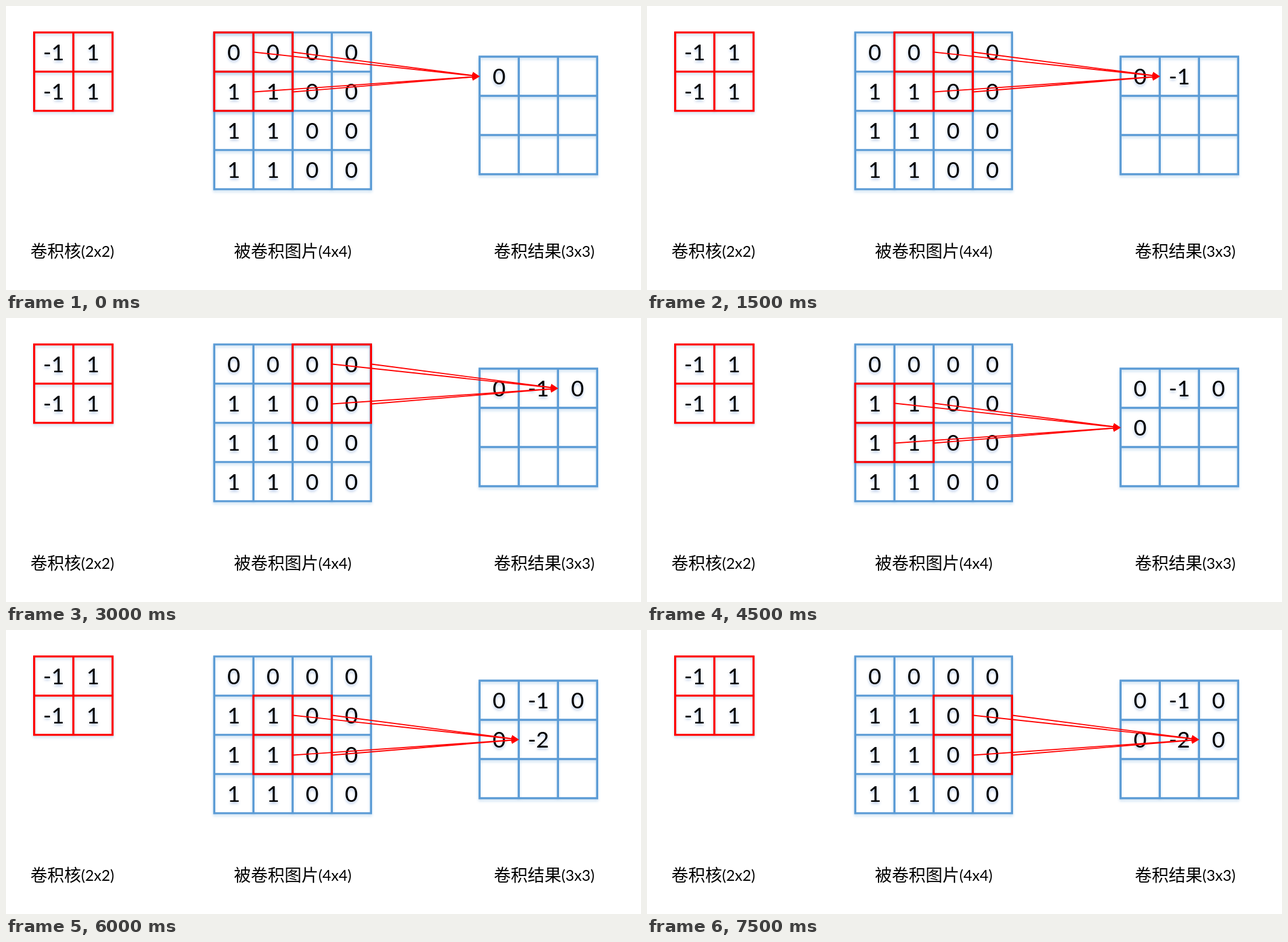
Recreate the animation shown at these times as an HTML page. Size 1053 by 471 pixels, loop 8000 ms.

```html
<!DOCTYPE html>
<html lang="zh">
<head>
<meta charset="utf-8">
<style>
  html, body { margin: 0; width: 100%; height: 100%; overflow: hidden; background: #fff; }
  svg { display: block; }
  text { font-family: Lato, sans-serif; }
  .grid { fill: none; stroke: #5b9bd5; stroke-width: 3.4; filter: drop-shadow(0 3px 2px #5b9bd555); }
  .red { stroke: #f00; }
  .digits { font-size: 37px; text-anchor: middle; filter: drop-shadow(0 3px 2px #4472c466); }
  .label { font-size: 25px; }
  .label .han { font: 28px "Noto Sans CJK SC", "Noto Sans CJK", sans-serif; }
  #window .arrow { stroke: #f00; stroke-width: 1.8; }
</style>
</head>
<body>
<svg id="stage" width="1053" height="471" viewBox="0 0 1053 471"></svg>
<script>
const CELL = 65, STEP = 1500, LOOP = 8000;
const stage = document.getElementById('stage');

function grid(x, y, n, color = '') {
  const size = n * CELL;
  let d = `M${x} ${y}h${size}v${size}h${-size}z`;
  for (let i = 1; i < n; i++) d += `M${x + i * CELL} ${y}v${size}M${x} ${y + i * CELL}h${size}`;
  return `<path class="grid ${color}" d="${d}"/>`;
}

function digits(x, y, n, values, id = '') {
  const cells = values.map((value, i) =>
    `<text x="${x + (i % n + 0.5) * CELL}" y="${y + (Math.floor(i / n) + 0.5) * CELL + 13.5}">${value}</text>`);
  return `<g class="digits" id="${id}">${cells.join('')}</g>`;
}

function label(x, han, size) {
  return `<g class="label"><text class="han" x="${x}" y="416.5">${han}</text>
    <text x="${x + han.length * 28}" y="416">(${size})</text></g>`;
}

// Line with a filled head whose tip touches the first result cell
function arrow(x, y) {
  const tipX = 785.5, tipY = 116.8;
  const angle = Math.atan2(tipY - y, tipX - x) * 180 / Math.PI;
  const length = Math.hypot(tipX - x, tipY - y);
  return `<g transform="translate(${x} ${y}) rotate(${angle})">
    <path class="arrow" d="M0 0H${length - 10}"/>
    <path fill="#f00" d="M${length} 0l-12 -6v12z"/></g>`;
}

stage.innerHTML =
  grid(46.7, 43.9, 2, 'red') + digits(46.7, 43.9, 2, [-1, 1, -1, 1], 'kernel') +
  grid(345.3, 43.9, 4) +
  `<g id="window">${grid(345.3, 43.9, 2, 'red')}</g>` +
  digits(345.3, 43.9, 4, [0, 0, 0, 0, 1, 1, 0, 0, 1, 1, 0, 0, 1, 1, 0, 0], 'image') +
  grid(785.3, 84, 3) + digits(785.3, 84, 3, [0, -1, 0, 0, -2, 0], 'result') +
  `<g id="arrows">${[[411, 76.5], [476, 76.5], [411, 142.5], [476, 142.5]].map(p => arrow(...p)).join('')}</g>` +
  label(40.5, '卷积核', '2x2') + label(378, '被卷积图片', '4x4') + label(809, '卷积结果', '3x3');

document.querySelectorAll('#arrows .arrow').forEach(line => {
  line.setAttribute('stroke', '#f00');
  line.setAttribute('stroke-width', 1.8);
});

const movers = ['window', 'arrows'].map(id => document.getElementById(id));
const results = [...document.getElementById('result').children];
const start = performance.now();

function draw() {
  const step = Math.floor((performance.now() - start) % LOOP / STEP);
  const shift = `translate(${step % 3 * CELL} ${Math.floor(step / 3) * CELL})`;
  movers.forEach(group => group.setAttribute('transform', shift));
  results.forEach((text, i) => text.setAttribute('visibility', i <= step ? 'visible' : 'hidden'));
  requestAnimationFrame(draw);
}
draw();
</script>
</body>
</html>
```
